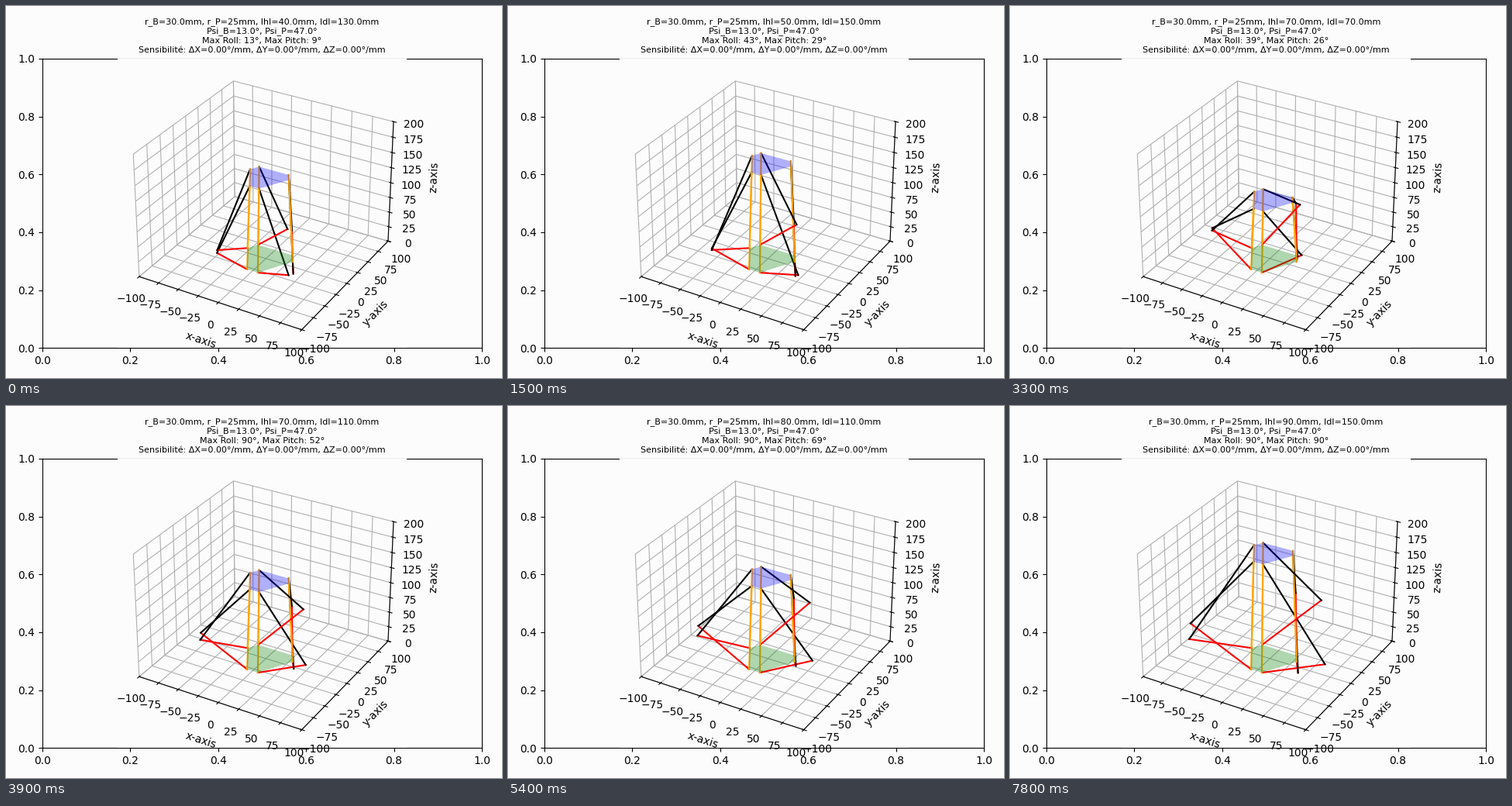
Recreate the animation shown at these times as a matplotlib script. Size 640 by 480 pixels, loop 8000 ms.

```python
import numpy as np
import matplotlib.pyplot as plt
from matplotlib.animation import FuncAnimation
from mpl_toolkits.mplot3d.art3d import Poly3DCollection

BACKGROUND = "#fcfcfc"
R_BASE, R_PLATFORM = 30, 25
PSI_BASE, PSI_PLATFORM = 13, 47
LIFT = 30          # height above home at which the tilt limits are measured
TICKS_PER_STEP = 3  # 100 ms ticks, each design is held for 300 ms

# Horn length -> shortest rod length; rods then grow by 20 mm up to 150 mm.
SHORTEST_ROD = {40: 130, 50: 90, 60: 70, 70: 70, 80: 70, 90: 50}
DESIGNS = [(horn, rod) for horn, first in SHORTEST_ROD.items()
           for rod in range(first, 151, 20)]

centres = np.repeat([-90, 30, 150], 2)
sides = np.tile([-1, 1], 3)
beta = np.radians(centres + 90 * sides)
horn_dir = np.array([np.cos(beta), np.sin(beta)])


def ring(radius, spread):
    psi = np.radians(centres + spread * sides)
    return np.array([radius * np.cos(psi), radius * np.sin(psi), np.zeros(6)])


base = ring(R_BASE, PSI_BASE)
platform = ring(R_PLATFORM, 60 - PSI_PLATFORM)


def horn_sines(horn, rod, tops):
    """Sine of the shifted servo angle (beyond 1: out of reach) and the shift."""
    leg = tops - base
    g = (leg ** 2).sum(axis=0) - rod ** 2 + horn ** 2
    e = 2 * horn * leg[2]
    f = 2 * horn * (horn_dir * leg[:2]).sum(axis=0)
    return g / np.hypot(e, f), np.arctan2(f, e)


def home_height(horn, rod):
    offset = platform[:, 0] - base[:, 0]
    return np.sqrt(horn ** 2 + rod ** 2 - offset @ offset)


def tilt(axis, degrees):
    c, s = np.cos(np.radians(degrees)), np.sin(np.radians(degrees))
    x, y, z = platform
    return np.array([x, y * c, y * s] if axis == "roll" else [x * c, y, -x * s])


def max_tilt(axis, horn, rod):
    height = np.array([[0], [0], [home_height(horn, rod) + LIFT]])
    for degrees in range(1, 91):
        sines, _ = horn_sines(horn, rod, tilt(axis, degrees) + height)
        if np.abs(sines).max() > 1:
            return degrees - 1
    return 90


def solve(horn, rod):
    tops = platform + np.array([[0], [0], [home_height(horn, rod)]])
    sines, shift = horn_sines(horn, rod, tops)
    angle = np.arcsin(sines) - shift
    tips = base + horn * np.vstack([np.cos(angle) * horn_dir, np.sin(angle)])
    return tips, tops


def caption(horn, rod):
    roll, pitch = (max_tilt(axis, horn, rod) for axis in ("roll", "pitch"))
    return (f"r_B={R_BASE:.1f}mm, r_P={R_PLATFORM}mm, "
            f"lhl={horn:.1f}mm, ldl={rod:.1f}mm\n"
            f"Psi_B={PSI_BASE:.1f}°, Psi_P={PSI_PLATFORM:.1f}°\n"
            f"Max Roll: {roll}°, Max Pitch: {pitch}°\n"
            "Sensibilité: ΔX=0.00°/mm, ΔY=0.00°/mm, ΔZ=0.00°/mm")


POSES = [(*solve(*design), caption(*design)) for design in DESIGNS]

fig, frame_ax = plt.subplots(figsize=(6.4, 4.8), dpi=100, facecolor=BACKGROUND)
frame_ax.set_facecolor(BACKGROUND)
title = frame_ax.set_title(POSES[0][2], fontsize=8)
fig.tight_layout()

ax = fig.add_subplot(111, projection="3d", facecolor=BACKGROUND)
for axis in (ax.xaxis, ax.yaxis, ax.zaxis):
    axis.set_pane_color((1, 1, 1, 0))
ax.set_xlabel("x-axis")
ax.set_ylabel("y-axis")
ax.set_zlabel("z-axis")

ax.add_collection3d(Poly3DCollection([base.T], facecolors="green", alpha=0.3))
top_plate = Poly3DCollection([POSES[0][1].T], facecolors="blue", alpha=0.3)
ax.add_collection3d(top_plate)
legs = [[ax.plot([], [], [], color=color)[0]
         for color in ("red", "black", "orange")] for _ in range(6)]

ax.set_xlim(-100, 100)
ax.set_ylim(-100, 100)
ax.set_zlim(0, 200)


def update(tick):
    tips, tops, text = POSES[tick // TICKS_PER_STEP]
    for i, (arm, rod, link) in enumerate(legs):
        for line, start, end in ((arm, base, tips), (rod, tips, tops),
                                 (link, base, tops)):
            line.set_data_3d(*np.array([start[:, i], end[:, i]]).T)
    top_plate.set_verts([tops.T])
    title.set_text(text)
    return []


animation = FuncAnimation(fig, update, frames=80, interval=100,
                          repeat=True, repeat_delay=0)
plt.show()
```
